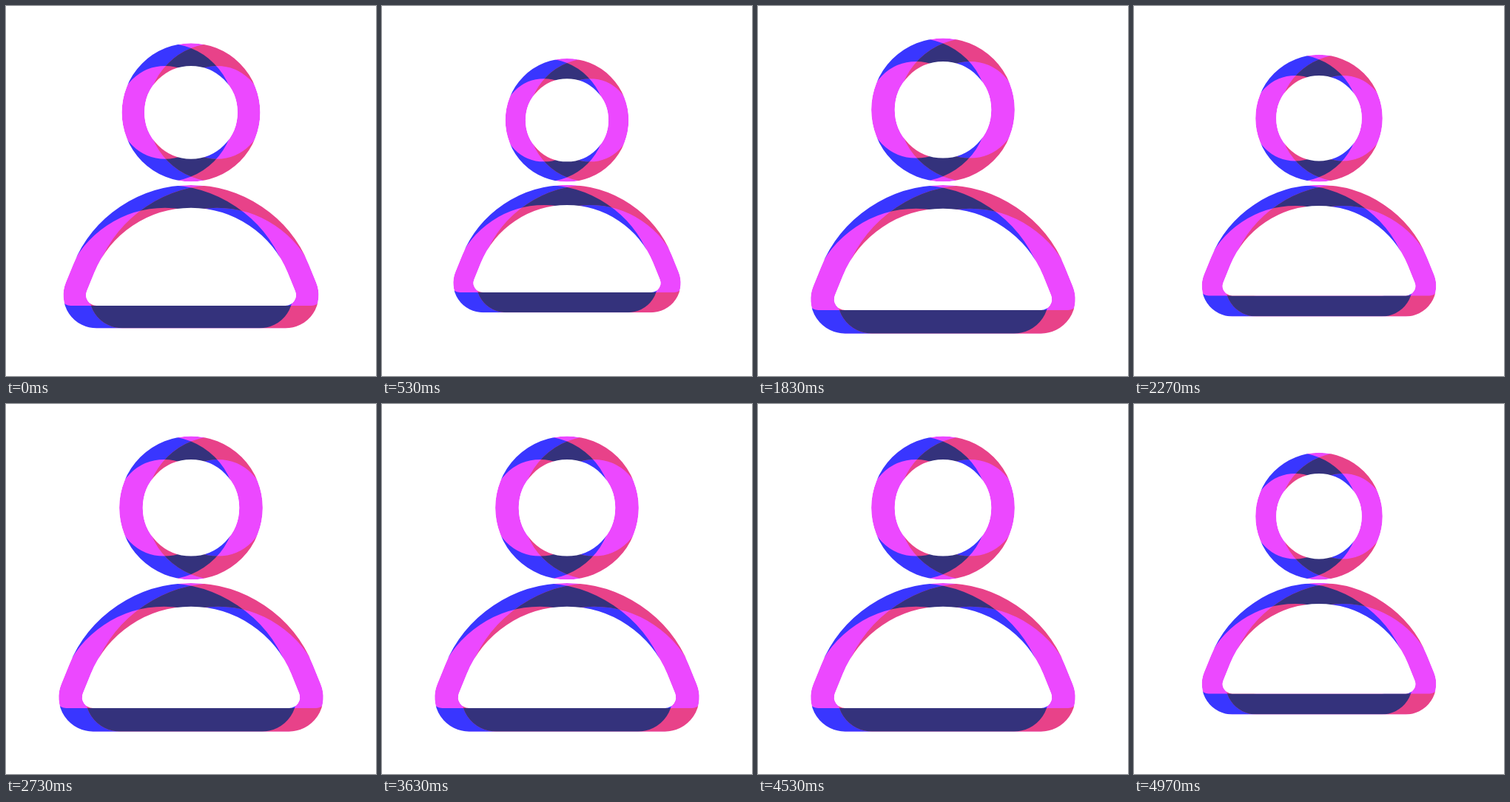
These frames come from a looping animation (500x500 px, 5.01 s). An HTML page:

```html
<!DOCTYPE html>
<html lang="en">
<head>
<meta charset="utf-8">
<title>Pulsing person icon</title>
<style>
  html, body { margin: 0; width: 100%; height: 100%; overflow: hidden; background: #fff; }
  svg { display: block; width: 100vw; height: 100vh; }
  use { fill: none; stroke-width: 30.6; }
  mask use { stroke: #fff; }
  .base { stroke: #ec48ff; }
  .blue { stroke: #3936ff; }
  .red  { stroke: #e84289; }
  .both { stroke: #34327c; }
</style>
</head>
<body>
<svg viewBox="0 0 500 500">
  <defs>
    <g id="icon">
      <circle cy="-96.2" r="78.2"/>
      <path d="M-127.7 180.2H127.7A29.5 29.5 0 0 0 155 139.6L144.9 114.7A156.5 156.5 0 0 0 -144.9 114.7L-155 139.6A29.5 29.5 0 0 0 -127.7 180.2Z"/>
    </g>
    <mask id="shape" maskUnits="userSpaceOnUse" x="-250" y="-250" width="500" height="500">
      <use href="#icon"/>
    </mask>
    <mask id="left" maskUnits="userSpaceOnUse" x="-250" y="-250" width="500" height="500">
      <use href="#icon" x="-35"/>
    </mask>
  </defs>
  <g id="person" transform="translate(250 240)">
    <!-- two sideways copies, seen only inside the icon itself -->
    <g mask="url(#shape)">
      <use class="base" href="#icon"/>
      <use class="blue" href="#icon" x="-35"/>
      <use class="red" href="#icon" x="35"/>
      <g mask="url(#left)"><use class="both" href="#icon" x="35"/></g>
    </g>
  </g>
</svg>
<script>
  const LOOP = 5010, STEP = 1000 / 30, STEPS = 150, BEAT = 27;
  const person = document.getElementById('person');

  // one beat: [step, scale], a quick swell and a slower release
  const keys = [
    [0, 1], [1, 1.0365], [4, 1.14], [5, 1.14], [9, 1.0245], [10, 1],
    [14, 0.918], [16, 0.891], [20, 0.867], [23, 0.868], [26, 0.963]
  ];

  function key(i) {
    const n = keys.length, turn = Math.floor(i / n);
    const [t, v] = keys[i - turn * n];
    return [t + turn * BEAT, v];
  }

  function slope(i) {
    const [t0, v0] = key(i - 1), [t1, v1] = key(i + 1);
    return (v1 - v0) / (t1 - t0);
  }

  function scaleAt(t) {
    let i = keys.length - 1;
    while (keys[i][0] > t) i--;
    const [t0, v0] = key(i), [t1, v1] = key(i + 1);
    const d = t1 - t0, u = (t - t0) / d, w = 1 - u;
    return v0 * w * w * (1 + 2 * u) + v1 * u * u * (3 - 2 * u)
      + d * u * w * (slope(i) * w - slope(i + 1) * u);
  }

  const start = performance.now();

  function draw() {
    const time = (performance.now() - start) % LOOP;
    const step = Math.min(STEPS - 1, Math.floor((time + 5) / STEP));
    const s = scaleAt(step % BEAT).toFixed(4);
    person.setAttribute('transform', `translate(250 240) scale(${s})`);
    requestAnimationFrame(draw);
  }
  draw();
</script>
</body>
</html>
```
